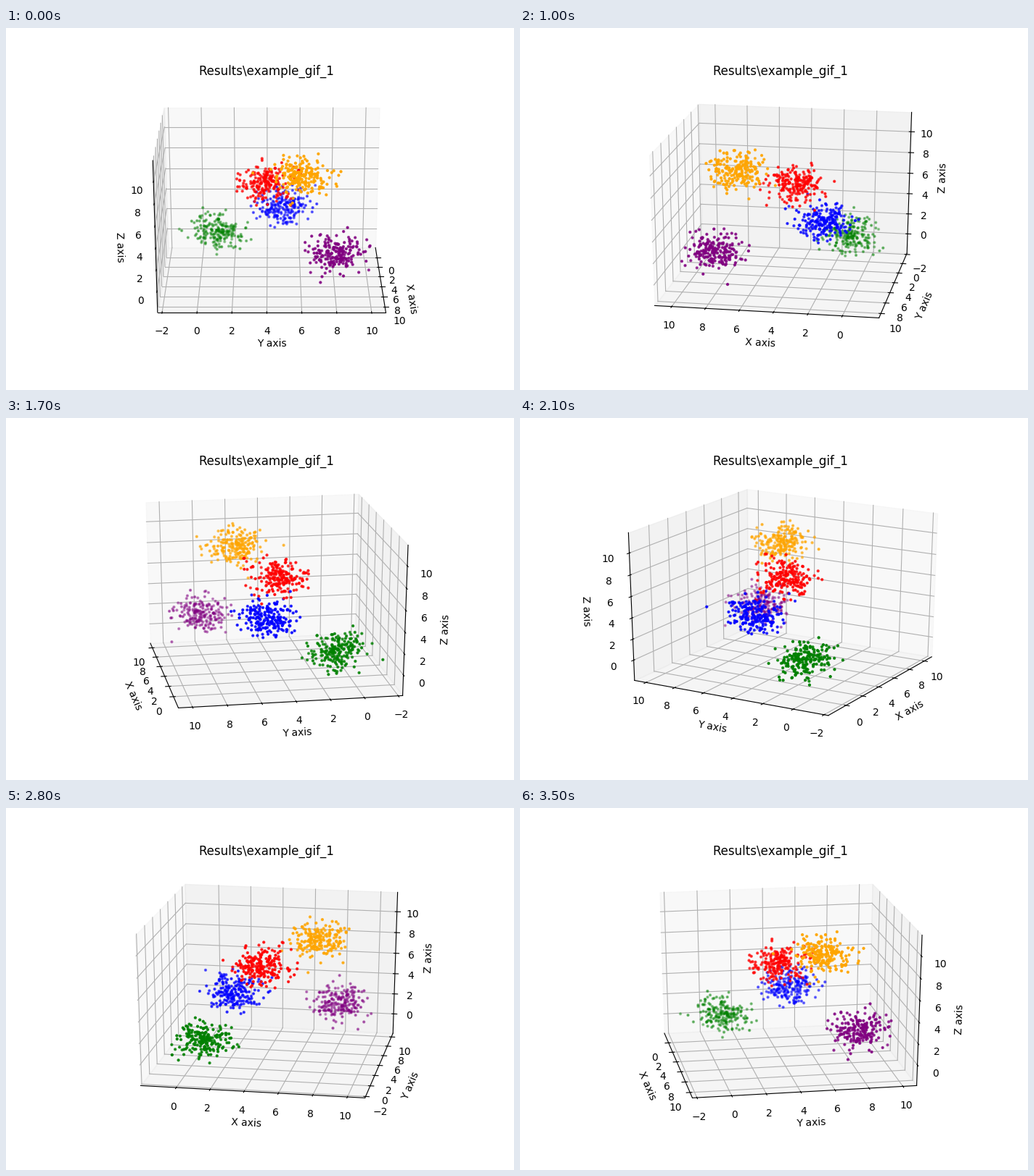
These frames come from a looping animation (700 px wide and 500 px high, 3600 ms). A matplotlib script:

```python
import numpy as np
import matplotlib.pyplot as plt
from matplotlib.animation import FuncAnimation
from matplotlib.collections import LineCollection, PolyCollection

W, H, DPI = 700, 500, 100
FRAMES, INTERVAL = 36, 100
ELEV, DIST = np.radians(22), 10
CENTER = np.array([366.08, 252.7])          # pixel position of the cube's middle
SCALE = np.array([542.5, 385]) / 0.185      # pixels per projected unit

LOW = np.array([-1.85, -2.0, -1.685])
HIGH = np.array([10.75, 10.55, 11.565])
DELTA = 1 / 12
HALF = 0.5 + DELTA / 4                      # half a cube edge, margin included
PER_POINT = 48 / (72 * (5.425 + 3.85))
TICK_PAD = 11.5 * PER_POINT * DELTA
LABEL_PAD = 25 * PER_POINT * DELTA
NAMES = ("X axis", "Y axis", "Z axis")
TICKS = (range(0, 11, 2), range(-2, 11, 2), range(0, 11, 2))
PANE_GREY = (0.95, 0.9, 0.925)

CLUSTERS = (
    ((1.0, 1.0, 1.1), (0, 0.5, 0)),
    ((3.9, 3.95, 7.0), (1, 0, 0)),
    ((2.05, 4.95, 4.0), (0, 0, 1)),
    ((7.0, 6.0, 8.85), (1, 0.647, 0)),
    ((8.0, 8.0, 2.1), (0.5, 0, 0.5)),
)
COUNT, SPREAD = 200, 0.78


def to_world(value, low, high):
    return (np.asarray(value) - (low + high) / 2) / (high - low)


def make_points():
    rng = np.random.default_rng(7)
    points, colors = [], []
    for center, color in CLUSTERS:
        noise = rng.standard_normal((COUNT, 3))
        noise = (noise - noise.mean(0)) / noise.std(0)
        points.append(np.array(center) + SPREAD * noise)
        colors += [color] * COUNT
    margin = (HIGH - LOW) * 0.05 / 1.1
    points = np.clip(np.vstack(points), LOW + margin, HIGH - margin)
    return to_world(points, LOW, HIGH), np.array(colors)


def project(points, azim):
    """Perspective view of centred cube coordinates: pixels and depth."""
    x, y, z = np.moveaxis(np.asarray(points, float), -1, 0)
    right = y * np.cos(azim) - x * np.sin(azim)
    front = x * np.cos(azim) + y * np.sin(azim)
    up = z * np.cos(ELEV) - front * np.sin(ELEV)
    depth = DIST - front * np.cos(ELEV) - z * np.sin(ELEV)
    flat = np.stack([right, up], -1) / depth[..., None]
    return CENTER + SCALE * flat, depth


def replaced(point, axis, value):
    out = np.array(point, float)
    out[axis] = value
    return out


def outward(point, axis, pad):
    """Push a point away from the middle along the two other axes."""
    shift = np.where(point < 0, -pad, pad)
    shift[axis] = 0
    return point + shift


def add_lines(segments, azim, color, zorder):
    ax.add_collection(LineCollection(
        project(segments, azim)[0], colors=color, linewidths=0.8,
        capstyle="projecting", zorder=zorder), autolim=False)


def draw_pane(axis, wall, azim):
    a, b = (axis + 1) % 3, (axis + 2) % 3
    corners = [replaced(replaced(wall, a, i * HALF), b, j * HALF)
               for i, j in ((-1, -1), (1, -1), (1, 1), (-1, 1))]
    grey = (PANE_GREY[axis],) * 3 + (0.5,)
    ax.add_collection(PolyCollection(
        [project(corners, azim)[0]], facecolors=[grey], edgecolors=[grey],
        linewidths=1, zorder=0), autolim=False)


def draw_axis(axis, wall, azim):
    side = 1 if axis == 0 else 0
    start = replaced(wall, side, -wall[side])
    end = replaced(start, axis, -start[axis])
    sign = np.sign(wall[side])

    grid, marks = [], []
    for tick in TICKS[axis]:
        at = to_world(tick, LOW[axis], HIGH[axis])
        base = replaced(wall, axis, at)
        for other in ((axis + 1) % 3, (axis + 2) % 3):
            grid.append([base, replaced(base, other, -base[other])])
        mark = replaced(start, axis, at)
        marks.append([replaced(mark, side, mark[side] + k * sign * DELTA)
                      for k in (0.1, -0.2)])
        pos = project(outward(mark, axis, TICK_PAD), azim)[0]
        ax.text(*pos, str(tick).replace("-", "\u2212"), ha="center", va="top",
                zorder=1.5)

    add_lines(grid, azim, "#b0b0b0", 1)
    add_lines([[start, end]] + marks, azim, "black", 1.2)

    p, q = project([start, end], azim)[0]
    angle = np.degrees(np.arctan2(q[1] - p[1], q[0] - p[0])) % 180
    if angle > 90:
        angle -= 180
    pos = project(outward((start + end) / 2, axis, LABEL_PAD), azim)[0]
    ax.text(*pos, NAMES[axis], rotation=angle, ha="center", va="center", zorder=1.5)


def draw_points(azim):
    pixels, depth = project(POINTS, azim)
    far = -1 / depth
    alpha = 1 - 0.7 * (far - far.min()) / (far.max() - far.min())
    order = np.argsort(-depth)
    rgba = np.column_stack([COLORS, alpha])[order]
    ax.scatter(*pixels[order].T, s=2.5, c=rgba, linewidths=1.5, zorder=2)


def draw(frame):
    ax.clear()
    ax.axis("off")
    ax.set(xlim=(0, W), ylim=(0, H))
    azim = np.radians(360 / FRAMES * frame)
    view = np.array([np.cos(azim), np.sin(azim), 1])
    wall = np.where(view < -1e-9, HALF, -HALF)   # the three planes facing away
    for axis in range(3):
        draw_pane(axis, wall, azim)
    for axis in range(3):
        draw_axis(axis, wall, azim)
    draw_points(azim)
    return []


plt.rcParams.update({"font.family": "DejaVu Sans", "font.size": 10,
                     "text.kerning_factor": 6})
POINTS, COLORS = make_points()
fig = plt.figure(figsize=(W / DPI, H / DPI), dpi=DPI, facecolor="white")
ax = fig.add_axes([0, 0, 1, 1])
fig.text(358.75 / W, 435.24 / H, "Results\\example_gif_1", fontsize=12,
         ha="center", va="baseline")

anim = FuncAnimation(fig, draw, frames=FRAMES, init_func=lambda: draw(0),
                     interval=INTERVAL, repeat=True, repeat_delay=0, blit=False)
plt.show()
```
